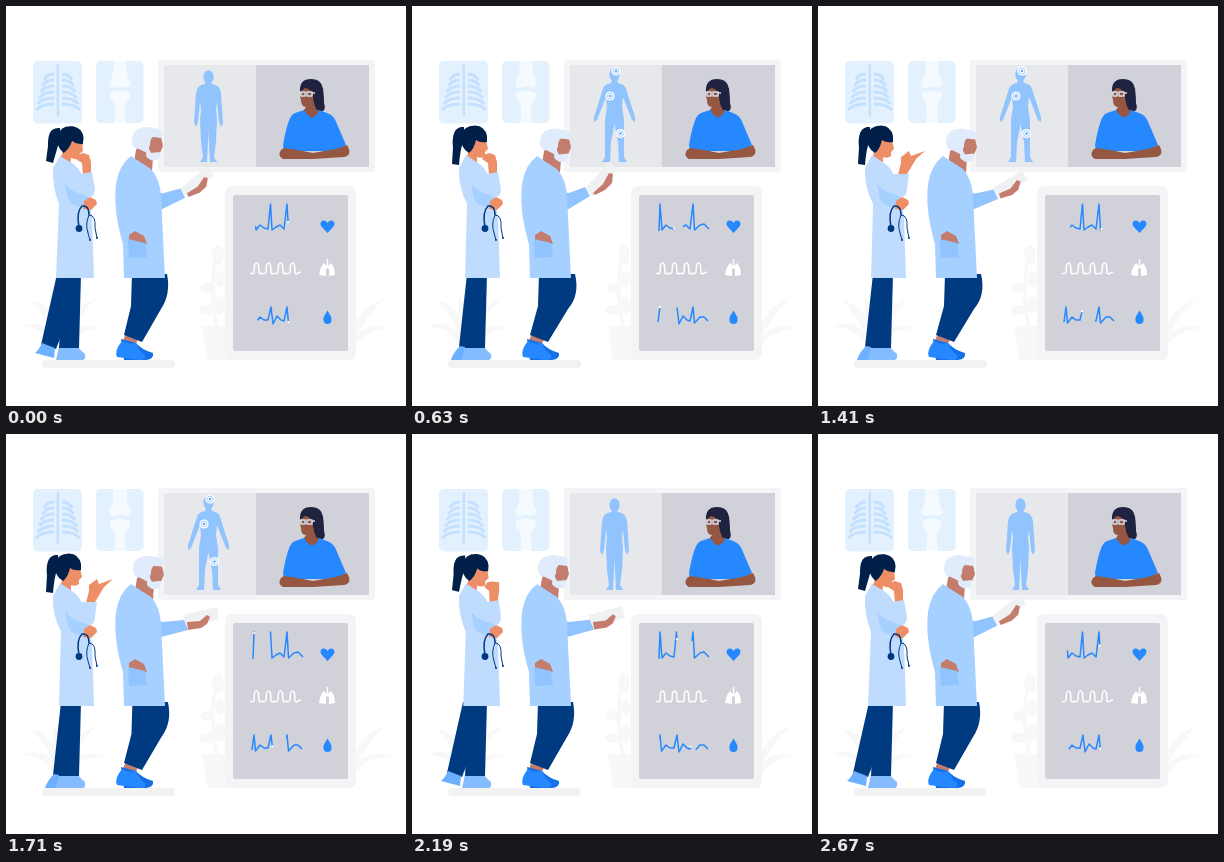
Recreate the animation shown at these times as an HTML page. Size 400 by 400 pixels, loop 2.7 s.

```html
<!DOCTYPE html>
<html lang="en">
<head>
<meta charset="utf-8">
<title>Medical consultation</title>
<style>
html, body { margin: 0; width: 100%; height: 100%; overflow: hidden; background: #fff }
svg { display: block; width: 100%; height: 100% }
.navy { fill: #003a80 } .ink { fill: #00204a } .blue { fill: #2688ff }
.skin { fill: #c47c6c } .peach { fill: #ee8e66 } .dark { fill: #955741 }
.coat { fill: #bfdcff } .shade { fill: #a6d0ff } .sky { fill: #91c3ff }
.frame { fill: #f3f4f5 } .glass { fill: #d1d1d9 } .plant { fill: #f8f8f9 }
.hair { fill: #e0ebfc } .lock { fill: #20233f }
.line { fill: none; stroke-width: 1.5; stroke-linejoin: round }
</style>
</head>
<body>
<svg viewBox="0 0 400 400">
  <g class="plant">
    <g id="leaves">
      <path d="M54 350Q50 310 15 320Q43 322 54 350ZM54 350Q56 300 25 295Q47 318 54 350ZM54 350Q65 315 47 290Q45 318 54 350ZM54 350Q55 305 90 292Q65 318 54 350ZM54 350Q63 312 97 322Q68 323 54 350Z"/>
    </g>
    <use href="#leaves" x="288"/>
    <path d="M196 320H223V354H201ZM209 320Q200 280 211 240L213 240Q204 285 213 320Z"/>
    <ellipse cx="212" cy="249" rx="6" ry="10"/><ellipse cx="202" cy="282" rx="8" ry="5"/>
    <ellipse cx="214" cy="273" rx="5" ry="8"/><ellipse cx="201" cy="304" rx="8" ry="5"/>
    <ellipse cx="214" cy="299" rx="6" ry="9"/>
  </g>
  <rect x="36" y="354" width="133" height="8" rx="4" fill="#f2f2f3"/>

  <!-- x-ray films -->
  <rect x="27" y="55" width="49" height="62.500" rx="5" fill="#e3f1ff"/>
  <g class="line" stroke="#c4e0ff">
    <path d="M51.800 58V110" stroke-width="2.500"/>
    <path id="ribs" stroke-width="3.200"/>
  </g>
  <rect x="90" y="55" width="47.500" height="62" rx="5" fill="#e3f1ff"/>
  <path d="M107 55H121Q119 67 124 75Q126 81 119 82Q114 79 109 82Q102 82 104 75Q109 67 107 55ZM104 87Q114 82 124 87Q125 92 120 97Q118 106 120 117H108Q110 106 108 97Q103 92 104 87Z" fill="#f5faff"/>

  <!-- wall screen -->
  <rect class="frame" x="152" y="54" width="217" height="112" rx="3"/>
  <rect x="158" y="59" width="92" height="102" fill="#e6e8eb"/>
  <rect class="glass" x="250" y="59" width="113" height="102"/>
  <g class="sky">
    <ellipse id="skull" cx="202.500" rx="5.200" ry="6.800"/>
    <path id="half"/>
    <use href="#half" transform="matrix(-1 0 0 1 405 0)"/>
  </g>
  <g id="spots"></g>
  <g>
    <path class="lock" d="M302 84L317 82L318 97Q320 103 317 105L306 106Z"/>
    <path class="blue" d="M289 107L298 104H313L321 107Q328 109 331 118L340 139L331 145H278L277 139Q280 121 284 112Q286 108 289 107Z"/>
    <path class="dark" d="M296 82H308L310 103L313 105Q306 118 298 104L300 101Q295 101 295 94L294 90Z"/>
    <path class="lock" d="M294 86Q293 73 305 73Q316 73 317 84L318 98L316 104Q309 104 308 97L306 86Q302 82 299 82Z"/>
    <path class="line" stroke="#d3dcea" stroke-width="1" d="M295 86H299V90H295ZM301 86H306V90H301ZM306 87H309"/>
    <path class="dark" d="M275 144L278 142Q288 143 307 147L330 143L341 139Q347 149 338 151L307 153H277Q271 150 275 144Z"/>
  </g>

  <!-- vitals monitor -->
  <rect class="frame" x="219" y="180" width="131" height="174" rx="7"/>
  <rect class="glass" x="227" y="189" width="115" height="156" rx="2"/>
  <path class="line" id="breath" stroke="#fff" stroke-width="1.300"/>
  <g id="traces"></g>
  <path class="blue" d="M321.500 227L315.500 220.500C312 215 319 212 321.500 217C324 212 331 215 327.500 220.500Z"/>
  <path fill="#fff" d="M320.800 253H322.200V260L325 257Q329 261 329 269L323 270V263L321.500 262L320 263V270L313 269Q314 261 318 257L320.800 260Z"/>
  <path class="blue" d="M321.500 304.500C324 309 326 311 325.500 314A4 4 0 0 1 317.500 314C317 311 319 309 321.500 304.500Z"/>

  <!-- nurse -->
  <path id="backLeg" class="navy"/>
  <path id="backFoot" fill="#6cb0ff"/>
  <path d="M53 341H72Q76 346 79 348Q80 354 76 354H50Z" fill="#84bcff"/>
  <path class="navy" d="M57 268H75L73 342H53Z"/>
  <path id="ponytail" class="ink"/>
  <g id="nurseHead">
    <path class="peach" d="M56 134L74 134L76 143L73 146L73 150Q70 153 65 151L65 159L54 155L57 142Z"/>
    <path class="ink" d="M49 130Q51 119.500 63 119.500Q73 120 75 130L75 136Q68 137 64 134Q62 143 57 147Q48 142 49 130Z"/>
  </g>
  <path id="nurseCoat" class="coat"/>
  <path class="shade" d="M59 178Q71 190 82 189L84 194L79 202Q66 201 62 193Z"/>
  <path id="nurseHand" class="peach"/>
  <path id="nurseSleeve" class="coat"/>
  <path class="peach" d="M78 195L84 191L90 194L91 198L85 204L77 203Z"/>
  <g class="line" stroke="#003a80">
    <path d="M73 221Q70 206 76 200Q83 199 83 209"/>
    <path d="M83 209Q79 218 82 227L84 234M83 209Q90 209 89 222L91 232" stroke-width="1"/>
  </g>
  <circle class="navy" cx="73" cy="222.500" r="3.400"/>
  <circle class="navy" cx="84" cy="234" r="1"/><circle class="navy" cx="91" cy="232" r="1"/>

  <!-- doctor -->
  <path class="skin" d="M121 325L133 331L129 340L116 337Z"/>
  <path id="doctorPants" class="navy"/>
  <path d="M115 333L130 337Q136 344 147 347Q148 353 140 354H118Z" fill="#1470e8"/>
  <path class="blue" d="M116 335Q122 339 130 337Q134 346 139 349Q141 354 134 354L111 351Q108 345 116 335Z"/>
  <path id="tablet" fill="#f0f1f3"/>
  <path id="doctorHand" class="skin"/>
  <path id="forearm" class="sky"/>
  <g id="doctorHead">
    <path class="skin" d="M138 130L155 131L157 140L154 147Q150 153 147 152L146 165L128 156L130 144Z"/>
    <path class="hair" d="M126 135Q126 121 142 121L155 123.500Q158 127 155 132L147 131Q144 133 144 139L141 147L133 143Q126 142 126 135Z"/>
    <path class="hair" d="M141 139L145 147L154 146L153 153Q145 157 140 150Z"/>
  </g>
  <path class="shade" d="M125 150L134 156L145 163Q154 173 155 190L159 272H118L117 238Q107 205 110 178Q113 159 125 150Z"/>
  <path class="skin" d="M123 229L129 225L138 230L141 238L123 235Z"/>
  <path class="sky" d="M122 233L139 237L141 251L123 252Z"/>
</svg>
<script>
const LOOP = 2700;
const el = id => document.getElementById(id);
const ease = k => k * k * (3 - 2 * k);
const clamp = k => Math.min(1, Math.max(0, k));

function add(parent, tag, attrs) {
  const node = document.createElementNS("http://www.w3.org/2000/svg", tag);
  for (const name in attrs) node.setAttribute(name, attrs[name]);
  return parent.appendChild(node);
}

// Eased value at t from [time, value] pairs.
function track(t, ...keys) {
  const i = keys.findIndex(key => key[0] > t);
  if (i < 0) return keys[keys.length - 1][1];
  if (i === 0) return keys[0][1];
  const [t0, a] = keys[i - 1], [t1, b] = keys[i];
  return a + (b - a) * ease((t - t0) / (t1 - t0));
}

// Blend two paths that share the same commands.
function mix(a, b, k) {
  const ends = b.match(/-?[\d.]+/g);
  let i = 0;
  return a.replace(/-?[\d.]+/g, n => (+n + (ends[i++] - n) * k).toFixed(2));
}

const morphs = {
  half: ["M203 75L200 76L199 78Q191 79 190 87L188 117L190 121L192 116L194 96L195 103L194 114L195 136L197 151L194 156L201 156L202 136L203 116Z",
         "M203 73L200 74L199 77Q191 78 190 86L182 111L182 116L185 114L194 91L195 101L193 114L193 136L193 151L190 156L198 156L199 136L203 116Z"],
  backLeg: ["M51 268L35 339L50 343L74 280L73 268Z", "M55 268L47 341L60 344L74 280L73 268Z"],
  backFoot: ["M36 337L49 342L48 352L29 347Q33 344 36 337Z", "M48 340L58 342L56 354L39 354Q41 347 48 340Z"],
  ponytail: ["M54 122C43 121 42 130 42 140L40 155L47 157Q51 143 54 133Z",
             "M52 121C42 120 40 130 41 141L40 158L47 159Q48 144 52 132Z"],
  nurseCoat: ["M54 150L66 157Q78 165 80 185L86 210L88 272L50 272L53 198Q46 180 47 162Z",
              "M54 149L66 157Q78 165 80 185L86 210L88 272L53 272L55 198Q46 180 47 162Z"],
  nurseHand: ["M77 169L76 157L70 153L72 149L77 147L83 149L85 156L85 168Z",
              "M80 169L83 157L83 151L91 145L93 150L107 145L98 153L89 168Z"],
  nurseSleeve: ["M74 168L86 166L89 183Q88 194 80 190L66 178Z", "M77 168L91 168L89 183Q88 194 80 190L66 178Z"],
  doctorPants: ["M126 268L161 268Q165 288 155 303L136 336L118 329L125 300Z",
                "M127 268L163 268Q168 289 156 303L136 336L118 329L126 300Z"],
  tablet: ["M173 183L197 156L206 163L181 190Z", "M177 181L211 173L213 185L180 195Z"],
  doctorHand: ["M181 187L191 178L197 167L201 168L200 177L193 184L183 189Z",
               "M181 188L194 187L201 181L204 183L201 190L195 194L182 196Z"],
  forearm: ["M150 186L157 187L173 181L178 190L155 204L150 204Z", "M150 186L157 188L178 186L182 196L155 203L150 204Z"]
};

el("ribs").setAttribute("d", [0, 1, 2, 3, 4, 5].map(i => {
  const y = 68 + i * 6, w = 10 + i * 1.6;
  return `M48 ${y}q${-w * 0.7} 0 ${-w} 6M56 ${y}q${w * 0.7} 0 ${w} 6`;
}).join(""));
el("breath").setAttribute("d", "M244 267" + "q3 2 4-1l.5-7q2-4 4 0l.5 8q1 2 3 0".repeat(4) + "l3-1");

const spots = [[204, 65], [198, 90], [208.5, 127.5]].map(([x, y]) => {
  const g = add(el("spots"), "g", {});
  add(g, "circle", { r: 4.6, fill: "#fff" });
  add(g, "circle", { r: 2.9, fill: "none", stroke: "#91c3ff", "stroke-width": 0.8 });
  add(g, "circle", { r: 1.2, fill: "#5ca6ff" });
  return { g, x, y };
});

// Each pulse line is drawn by a new stroke while the previous one is wiped away.
const traces = [
  [1350, "M247 225L248 198L250 224L254 219L258 222L262 223L264.5 198L266 224L270 221L274 219L278 223L281 198L282.5 224L288 219L292 218L297 223"],
  [2700, "M246 316L248 301L249.5 317L254 311L258 314L262 314L265 301L267 318L271 310L275 314L278 315L281 301L282.5 317L288 311L292 311L296 315"]
].map(([period, d]) => {
  const strokes = [0, 1].map(() => add(el("traces"), "path", { class: "line", stroke: "#2688ff", d, pathLength: 100 }));
  const dot = add(el("traces"), "circle", { r: 1.1, fill: "#fff" });
  return { period, strokes, dot, length: strokes[0].getTotalLength() };
});

function drawTrace({ period, strokes, dot, length }, t) {
  const phase = t / period % 1;
  strokes.forEach((path, i) => {
    const age = phase + i;
    const head = clamp(age - 0.13), tail = clamp(0.8 * (age - 0.7));
    path.setAttribute("stroke-dasharray", `0 ${tail * 100} ${Math.max(0, head - tail) * 100} 200`);
  });
  const p = strokes[0].getPointAtLength((phase + 0.87) % 1 * length);
  dot.setAttribute("cx", p.x);
  dot.setAttribute("cy", p.y);
}

function draw(t) {
  const scan = track(t, [60, 0], [540, 1], [1710, 1], [2040, 0]);
  const glow = track(t, [250, 0], [600, 1], [1740, 1], [2130, 0]);
  const step = track(t, [60, 0], [600, 1], [1710, 1], [2070, 0]);
  const nod = track(t, [60, 1], [600, 0], [1950, 0], [2380, 1]);
  const open = track(t, [690, 0], [1230, 1], [1770, 1], [2340, 0]);
  const lean = track(t, [60, 0], [600, 1], [1440, 1], [1950, 0]);
  const reach = track(t, [0, 0.28], [540, 0], [1170, 0], [1650, 1], [2100, 1], [2640, 0.28]);
  const amounts = {
    half: scan, backLeg: step, backFoot: step, ponytail: 1 - nod, nurseCoat: 1 - nod,
    nurseHand: open, nurseSleeve: open, doctorPants: lean,
    tablet: reach, doctorHand: reach, forearm: reach
  };
  for (const id in morphs) el(id).setAttribute("d", mix(...morphs[id], amounts[id]));

  el("skull").setAttribute("cy", 71 - 2.5 * scan);
  el("nurseHead").setAttribute("transform", `rotate(${7 * nod} 58 152)`);
  el("doctorHead").setAttribute("transform", `translate(${2 * lean} ${1.5 * lean})`);
  for (const { g, x, y } of spots) {
    g.setAttribute("transform", `translate(${x} ${y}) scale(${glow})`);
    g.setAttribute("opacity", glow);
  }
  for (const trace of traces) drawTrace(trace, t);
}

function frame() {
  draw(performance.now() % LOOP);
  requestAnimationFrame(frame);
}
frame();
</script>
</body>
</html>
```
